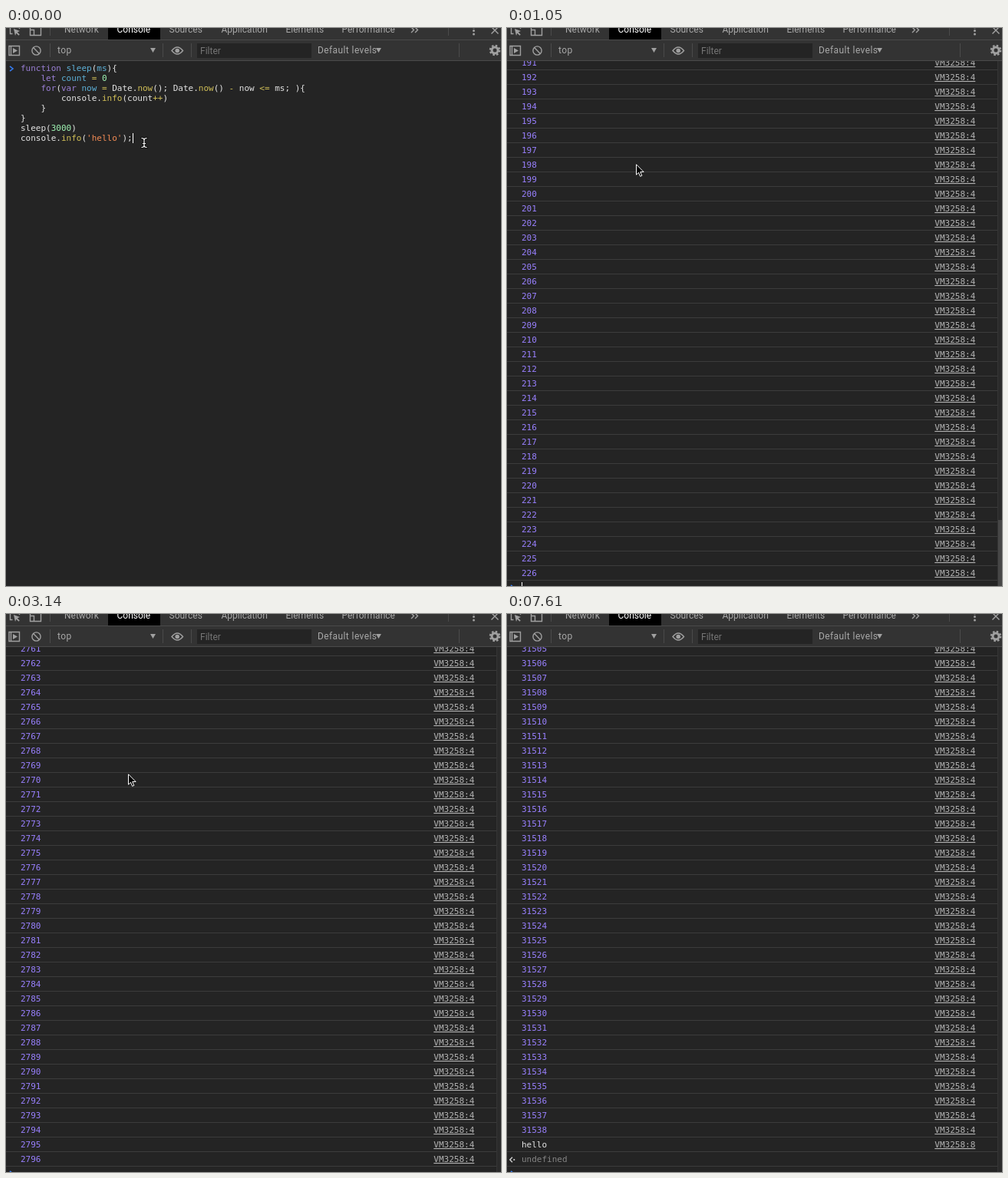
An HTML page for the animation above (7.71 s loop, 645 by 727 pixels).

```html
<!DOCTYPE html>
<html lang="en">
<head>
<meta charset="utf-8">
<title>Console</title>
<style>
  html, body { margin: 0; width: 100%; height: 100%; overflow: hidden; background: #242424; }
  svg { display: block; }
  text { white-space: pre; }
  .mono { font: 11px "DejaVu Sans Mono", monospace; fill: #e3e3e3; }
  .ui { font: 12px Roboto, "Liberation Sans", sans-serif; fill: #a8a8a8; }
  .wide { letter-spacing: .4px; }
  .icon { fill: none; stroke: #a0a0a0; stroke-width: 1.4; }
  .solid { fill: #a0a0a0; }
  .rule { stroke: #4a4a4a; }
  .k { fill: #9a7fd5; }
  .d { fill: #5db0d7; }
  .n { fill: #a1f7b5; }
  .s { fill: #f28b54; }
  .o { fill: #d2c057; }
  .num { fill: #9980ff; }
  .link { fill: #b4b4b4; text-decoration: underline; }
  .dim { fill: #858585; }
  .prompt { fill: none; stroke: #367cf1; stroke-width: 1.6; }
  .old { stroke: #a8a8a8; }
</style>
</head>
<body>
<svg width="645" height="727" viewBox="0 0 645 727">
  <rect width="645" height="727" fill="#242424"/>

  <g id="editor">
    <g id="code" class="mono"></g>
    <path id="mark" class="prompt" d="M5 49.8l4 3.2-4 3.2"/>
    <g id="next">
      <path d="M0 152.5h645" stroke="#424242"/>
      <path class="prompt" d="M5 159.8l4 3.2-4 3.2"/>
    </g>
  </g>

  <g id="log">
    <g id="rows" class="mono"></g>
    <path id="reply" d="M7 707.8l-3.2 3.2 3.2 3.2" fill="none" stroke="#d0d0d0" stroke-width="1.4"/>
    <circle id="dot" cx="9.3" cy="711" r="1.1" fill="#d0d0d0"/>
    <path class="prompt" d="M5 725.8l4 3.2-4 3.2"/>
    <rect x="639" y="43" width="6" height="684" fill="#2b2b2b"/>
    <path d="M639.5 43v684" stroke="#353535"/>
    <rect id="thumb" x="640" y="641" width="5" height="86" fill="#474747"/>
  </g>

  <rect id="caret" width="1" height="13" fill="#fff"/>

  <g id="toolbar">
    <rect width="645" height="43" fill="#333"/>
    <path class="rule" d="M0 15.5h645M0 42.5h645M57.5 0v10M576.5 0v10M57.5 20v18M204.5 20v18M241.5 20v18M590.5 20v18"/>
    <rect x="133" width="68" height="15" fill="#000"/>
    <g id="tabs" class="ui"></g>
    <rect x="249" y="20" width="149" height="19" fill="#242424"/>
    <g class="ui">
      <text class="wide" x="67" y="33">top</text>
      <text x="253" y="34" fill="#757575" style="fill:#757575">Filter</text>
      <text class="wide" x="406" y="33">Default levels</text>
    </g>
    <path class="solid" d="M188 26h7l-3.5 6zM482 26h7l-3.5 6z"/>
    <g class="icon">
      <path d="M5.5 0v7.5h3M17.5 0v1M31.5 0v9.5h14V0M36.5 9.5V2.5h-5"/>
      <path d="M4 23.5h13.5v12H4zM6.5 23.5v12"/>
      <circle cx="39.5" cy="29.5" r="5.6"/>
      <path d="M35.6 25.6l7.8 7.8M528 -1l3.5 3.5L528 6M533 -1l3.5 3.5L533 6M632.5 -1.5l9 9M641.5 -1.5l-9 9"/>
      <path d="M216 29.5q7.2-9 14.5 0q-7.2 9-14.5 0z"/>
      <circle cx="637" cy="29" r="4" stroke-width="3"/>
      <circle cx="637" cy="29" r="6.2" stroke-width="2.2" stroke-dasharray="2.5 2.37"/>
    </g>
    <path class="solid" d="M10 1l8 3-3.2 1.4 3 3-1.4 1.4-3-3L12 10zM9 26l6 3.5-6 3.5z"/>
    <g class="solid">
      <circle cx="223.2" cy="29.5" r="2.8"/>
      <circle cx="609.5" cy="-1" r="1.5"/>
      <circle cx="609.5" cy="3.5" r="1.5"/>
      <circle cx="609.5" cy="8" r="1.5"/>
    </g>
  </g>

  <g id="beam" fill="none" stroke-linecap="square">
    <path id="beamShape" d="M177 143.5q2.5 0 3 2q.5-2 3-2M180 145v9M177 155.5q2.5 0 3-2q.5 2 3 2M178.5 150.5h3" stroke="#111" stroke-width="3"/>
    <use href="#beamShape"/>
    <path d="M177 143.5q2.5 0 3 2q.5-2 3-2M180 145v9M177 155.5q2.5 0 3-2q.5 2 3 2M178.5 150.5h3" stroke="#fff" stroke-width="1.2"/>
  </g>
  <path id="arrow" d="M.5 .8v13.4l3-2.9 2.1 5 2.2-.9-2.1-4.9h4.4z" fill="#000" stroke="#fff"/>
</svg>

<script>
const $ = id => document.getElementById(id);
const show = (id, on) => $(id).setAttribute("display", on ? "inline" : "none");
const move = (id, x, y) => $(id).setAttribute("transform", `translate(${x} ${y})`);

// Highlighting marks: k keyword, d definition, n number, s string, o operator or property
const source = [
  "k[function] d[sleep](d[ms]){",
  "    k[let] d[count] o[=] n[0]",
  "    k[for](k[var] d[now] o[=] Date.o[now](); Date.o[now]() o[-] now o[&lt;=] ms; ){",
  "        console.o[info](counto[++])",
  "    }",
  "}",
  "sleep(n[3000])",
  "console.o[info](s['hello']);"
];
$("code").innerHTML = source.map((line, i) =>
  `<text x="19" y="${56 + 13 * i}">` +
  line.replace(/([kdnso])\[(.*?)\]/g, '<tspan class="$1">$2</tspan>') + "</text>").join("");

const tabs = { Network: 76, Console: 144.5, Sources: 212.5, Application: 280.5, Elements: 364.5, Performance: 437.5 };
$("tabs").innerHTML = Object.entries(tabs).map(([name, x]) =>
  `<text x="${x}" y="6"${name === "Console" ? ' style="fill:#fff"' : ""}>${name}</text>`).join("");

function fillLog(first, done) {
  let html = "";
  for (let i = 0; i < 36; i++) {
    const y = 49 + 19 * i;
    const tail = done ? i - 33 : 0;
    const [type, label] = tail === 2 ? ["dim", "undefined"] : tail === 1 ? ["", "hello"] : ["num", first + i];
    html += `<text class="${type}" x="19" y="${y}">${label}</text>`;
    if (tail !== 2) html += `<text class="link" x="557.3" y="${y}">VM3258:${tail === 1 ? 8 : 4}</text>`;
    html += `<path d="M0 ${y + 5.5}h639" stroke="#3c3c3c"/>`;
  }
  $("rows").innerHTML = html;
}

// Each pointer step: start time, x, y
const steps = [[150, 179, 147], [1050, 168, 177], [1190, 159, 208], [6740, 443, 571], [6880, 468, 605], [7030, 534, 665]];
const within = (t, a, b) => t >= a && t < b;
let shown = -1;

function draw(t) {
  const sent = t >= 150, logging = t >= 900, done = t >= 5990;

  show("editor", !logging);
  show("log", logging);
  show("next", sent);
  move("code", 0, sent ? 1 : 0);
  move("mark", 0, sent ? 1 : 0);
  $("mark").classList.toggle("old", sent);

  const first = done ? 31505 : t >= 3140 ? 2761 : 191;
  if (first !== shown) fillLog(shown = first, done);
  show("thumb", t < 3140);
  show("reply", done);
  show("dot", done);

  show("caret", t < 3140 || within(t, 5990, 6590) || within(t, 7030, 7610));
  if (logging) move("caret", 19, 722);
  else if (sent) move("caret", 19, 156);
  else move("caret", 165, 137);

  show("beam", !sent);
  show("arrow", within(t, 150, 7180));
  const step = steps.filter(s => s[0] <= t).pop();
  if (step) move("arrow", step[1], step[2]);
}

function tick() {
  draw(performance.now() % 7710);
  requestAnimationFrame(tick);
}
tick();
</script>
</body>
</html>
```
